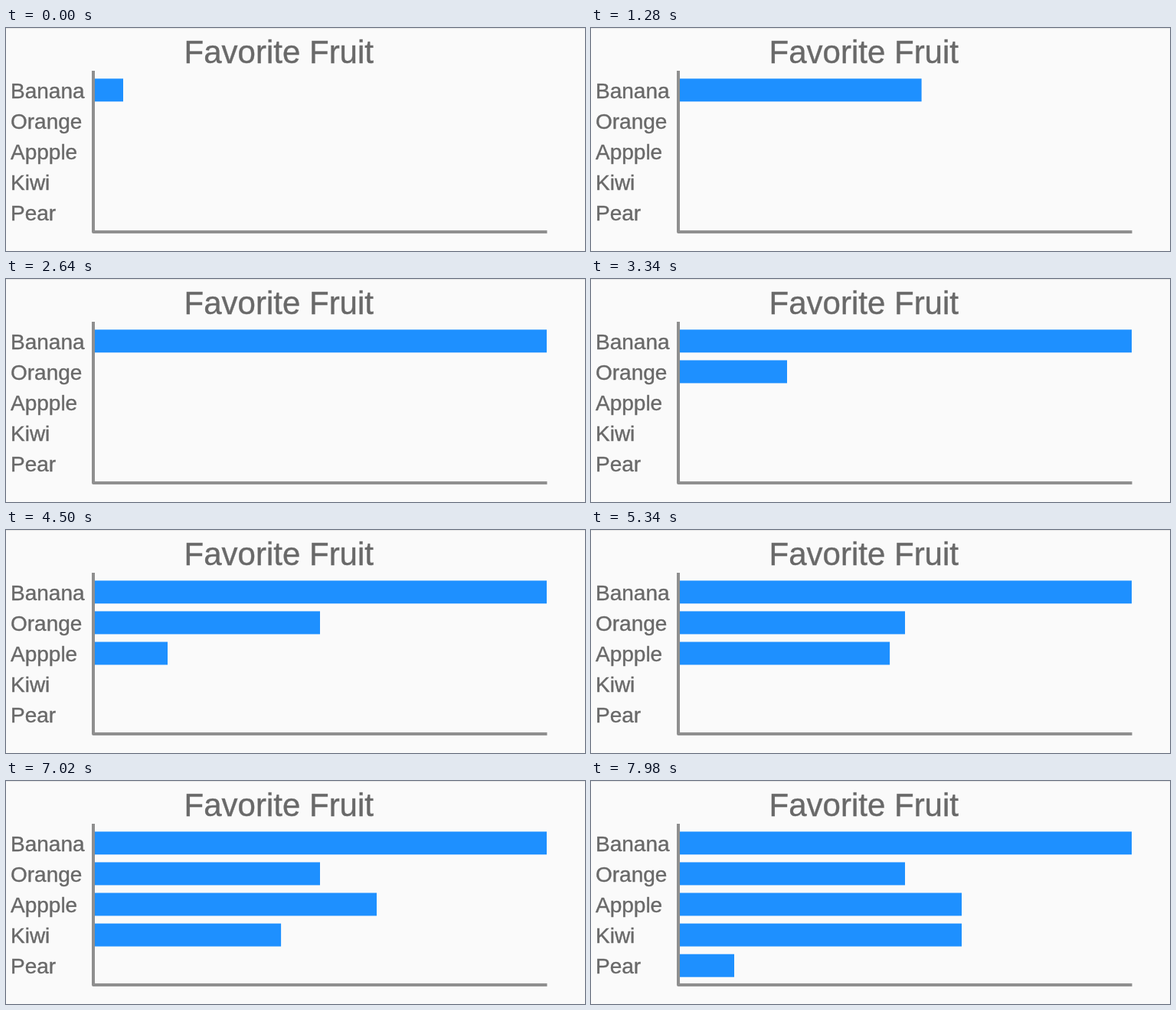
These frames come from a looping animation (756 by 292 pixels, 8000 ms). An HTML page:

```html
<!DOCTYPE html>
<html lang="en">
<head>
<meta charset="utf-8">
<title>Favorite Fruit</title>
<style>
  html, body { margin: 0; width: 100%; height: 100%; overflow: hidden; background: #fafafa; }
  svg { display: block; width: 756px; height: 292px; }
  text {
    font-family: "Liberation Sans", Arial, sans-serif;
    font-size: 28px;
    font-kerning: none;
    fill: #696969;
    stroke: #696969;
    stroke-width: .4px;
  }
  .title { font-size: 42px; }
  .bar { fill: #1e90ff; }
  .axis { fill: none; stroke: #8f8f8f; stroke-width: 4; stroke-linejoin: round; }
</style>
</head>
<body>
<svg viewBox="0 0 756 292">
  <rect width="756" height="1" fill="#e6e6e6"/>
  <text class="title" x="232.6" y="46">Favorite Fruit</text>
  <g id="rows"></g>
  <path class="axis" d="M114 56V267H706.5"/>
</svg>
<script>
  const LOOP = 8000;
  const BAR_LEFT = 115;
  const SPEED = 9.95; // pixels per step

  // start is the step at which a bar begins to grow
  const fruits = [
    { name: "Banana", start: -3.82, width: 591 },
    { name: "Orange", start: 56.83, width: 295 },
    { name: "Appple", start: 87.35, width: 369 },
    { name: "Kiwi", start: 126.47, width: 369 },
    { name: "Pear", start: 163.76, width: 369 }
  ];

  function add(tag, attributes) {
    const node = document.createElementNS("http://www.w3.org/2000/svg", tag);
    for (const key in attributes) node.setAttribute(key, attributes[key]);
    return document.getElementById("rows").appendChild(node);
  }

  fruits.forEach((fruit, row) => {
    add("text", { x: 6, y: 91.5 + 40.1 * row }).textContent = fruit.name;
    fruit.bar = add("rect", {
      class: "bar", x: BAR_LEFT, y: 66.3 + 40.1 * row, width: 0, height: 30
    });
  });

  // Steps come in threes, held for 20, 100 and 20 ms.
  function stepAt(time) {
    const rest = time % 140;
    return 3 * Math.floor(time / 140) + (rest >= 20) + (rest >= 120);
  }

  function draw(time) {
    const step = stepAt(time);
    for (const { bar, start, width } of fruits) {
      const grown = Math.max(0, Math.min(width, (step - start) * SPEED));
      bar.setAttribute("width", grown.toFixed(1));
    }
  }

  const began = performance.now();
  function tick() {
    draw((performance.now() - began) % LOOP);
    requestAnimationFrame(tick);
  }
  tick();
</script>
</body>
</html>
```
